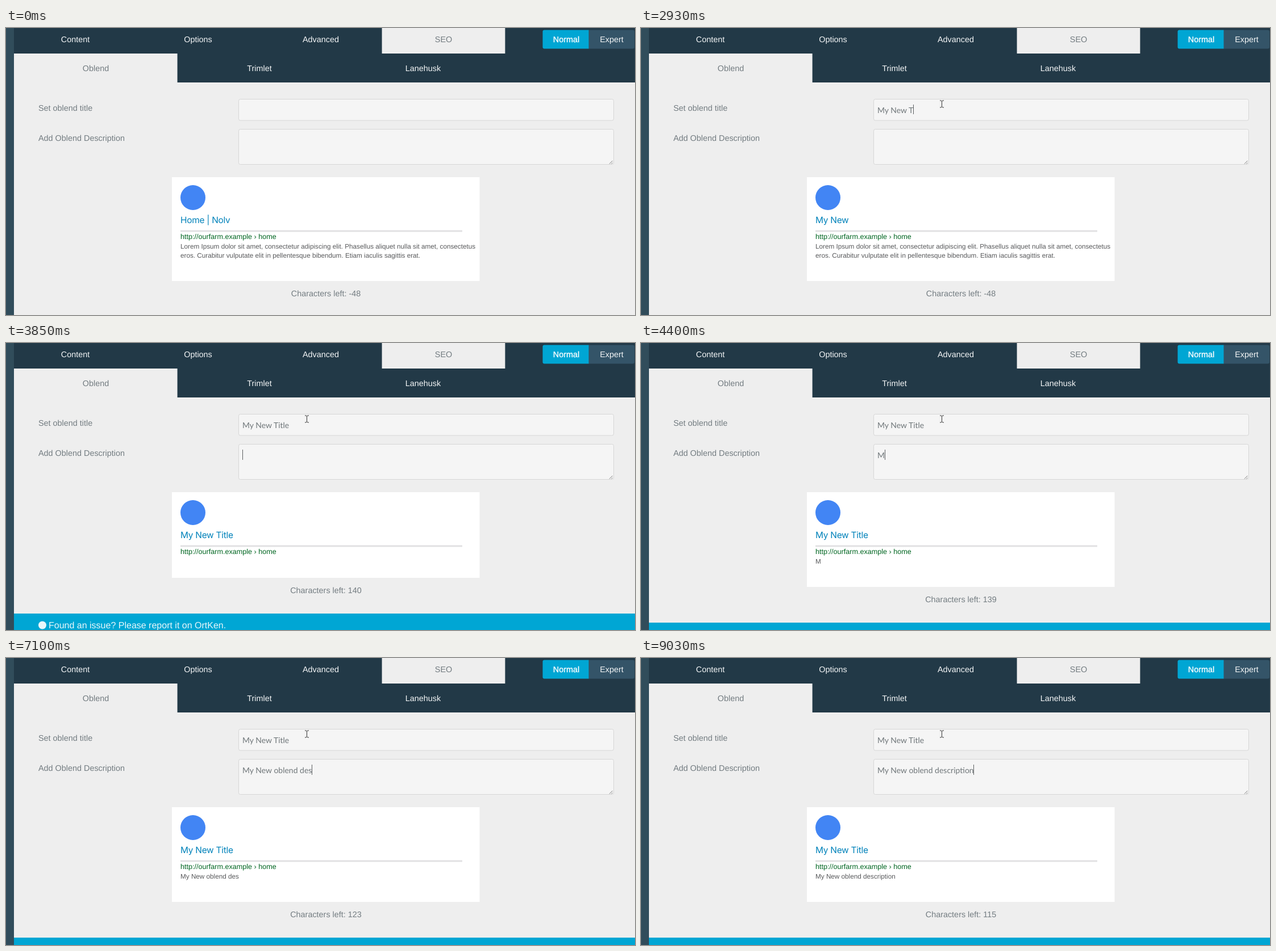
Recreate the animation shown at these times as an HTML page. Size 1107 by 506 pixels, loop 9100 ms.

```html
<!DOCTYPE html>
<html lang="en">
<head>
<meta charset="utf-8">
<title>Search preview form</title>
<style>
  html, body { margin: 0; width: 100%; height: 100%; overflow: hidden; background: #eee; }
  svg { display: block; }
  text { font: 14.4px "Liberation Sans", Arial, sans-serif; fill: #737c81; white-space: pre; text-rendering: geometricPrecision; }
  .mid text, text.mid { text-anchor: middle; }
  .light text { fill: #f4f6f7; }
  .light text.active { fill: #737c81; }
  .light text.chosen { fill: #fff; stroke: #fff; stroke-width: .3px; }
  .box { fill: #f5f5f5; stroke: #d6d6d6; }
  .typed { font: 14px Lato, sans-serif; fill: #6f7679; }
  #headline { font: 15.5px Inter, sans-serif; letter-spacing: -.3px; fill: #0082ba; }
  .link { font-size: 12.6px; fill: #006621; }
  .snippet { font-size: 11.73px; fill: #58595b; }
  #footer text { font-size: 16px; fill: #e9f7fb; }
</style>
</head>
<body>
<svg width="1107" height="506" viewBox="0 0 1107 506">
  <rect width="1107" height="506" fill="#eee"/>
  <rect width="14" height="506" fill="#314d5b"/>
  <path d="M14 0H1107V96H14z" fill="#223947"/>
  <path d="M661.600 0H878.400V45H661.600zM14 45H301.600V96H14z" fill="#eee"/>
  <path d="M1025 3.500h78a3 3 0 0 1 3 3v27a3 3 0 0 1-3 3h-78z" fill="#345468"/>
  <path d="M1025.500 3.500h-78a3 3 0 0 0-3 3v27a3 3 0 0 0 3 3h78z" fill="#00a6d4"/>
  <g class="mid light">
    <text x="122" y="25">Content</text>
    <text x="338" y="25">Options</text>
    <text x="554" y="25">Advanced</text>
    <text x="770" y="25" class="active">SEO</text>
    <text x="986" y="25" class="chosen">Normal</text>
    <text x="1066" y="25">Expert</text>
    <text x="158" y="76" class="active">Oblend</text>
    <text x="446" y="76">Trimlet</text>
    <text x="734" y="76">Lanehusk</text>
  </g>

  <text x="57" y="146">Set oblend title</text>
  <text x="57" y="199">Add Oblend Description</text>
  <rect class="box" x="409.500" y="125.500" width="660" height="37.500" rx="3"/>
  <rect class="box" x="409.500" y="178.500" width="660" height="62" rx="3"/>
  <path d="M1062 239.500l5.500-5.500M1065.500 239.500l2-2" stroke="#777"/>
  <text class="typed" id="title" x="416" y="149.500"></text>
  <text class="typed" id="desc" x="416" y="202.500"></text>
  <rect id="caret" width="1" fill="#5c5f61"/>

  <rect id="card" x="292" y="263" width="541.500" fill="#fff"/>
  <circle cx="329" cy="299" r="22" fill="#4285f4"/>
  <text id="headline" x="307" y="343.500"></text>
  <rect x="307" y="356.500" width="496" height="3" fill="#e2e1e3"/>
  <text class="link" x="307" y="372">http://ourfarm.example › home</text>
  <text class="snippet" id="line1" x="307" y="389"></text>
  <text class="snippet" id="line2" x="307" y="405"></text>
  <text class="mid" id="counter" x="563"></text>

  <g id="footer">
    <rect x="14" width="1093" height="60" fill="#00a6d4"/>
    <circle cx="64" cy="20.500" r="7" fill="#e9f7fb"/>
    <text x="75" y="26">Found an issue? Please report it on OrtKen.</text>
  </g>
  <path id="pointer" d="M-3-6H-1L.5-5 2-6H4M.5-5V5M-3 6H-1L.5 5 2 6H4" fill="none" stroke="#333"/>
</svg>
<script>
const LOOP = 9100;
const $ = id => document.getElementById(id);
const TITLE = 'My New Title';
const DESC = 'My New oblend description';
const LOREM = [
  'Lorem Ipsum dolor sit amet, consectetur adipiscing elit. Phasellus aliquet nulla sit amet, consectetus',
  'eros. Curabitur vulputate elit in pellentesque bibendum. Etiam iaculis sagittis erat.'
];

// Moment of each keystroke, and of its echo in the preview, in 10 ms units.
const titleKeys = [99, 146, 163, 193, 208, 239, 255, 293, 316, 331, 339, 354];
const titleEcho = [116, 146, 163, 201, 216, 247, 255, 301, 324, 339, 346, 362];
const descKeys = [432, 463, 493, 533, 548, 571, 586, 602, 609, 617, 624, 632, 640,
  648, 663, 695, 703, 718, 741, 756, 764, 794, 802, 817, 825];
const descEcho = [440, 470, 501, 533, 556, 579, 594, 609, 617, 624, 632, 640, 648,
  655, 670, 703, 710, 726, 749, 764, 779, 802, 809, 825, 833];
const CLEARED = 3850, FOCUS_DESC = 3770;
const caretShown = [[910, 1380], [1460, 4170], [4320, 8630], [9030, LOOP]];

const typed = (text, times, t) => text.slice(0, times.filter(k => k * 10 <= t).length);
const set = (id, attrs) => {
  for (const name in attrs) $(id).setAttribute(name, attrs[name]);
};
const write = (id, text) => {
  if ($(id).textContent !== text) $(id).textContent = text;
};

function drawPointer(t) {
  const p = Math.min(5, Math.max(0, Math.floor((t - 210) / 76))) / 5;
  const left = (1 - p) ** 2;
  const x = Math.round(529 + 294 * left), y = Math.round(134 + 247 * left);
  set('pointer', { transform: `translate(${x} ${y})`, visibility: t < 210 ? 'hidden' : 'visible' });
}

function drawCaret(t) {
  const inDesc = t >= FOCUS_DESC;
  const x = 416 + Math.floor($(inDesc ? 'desc' : 'title').getComputedTextLength());
  const on = caretShown.some(([from, to]) => t >= from && t < to);
  set('caret', {
    x, y: inDesc ? 188 : 135, height: inDesc ? 18 : 17,
    visibility: on ? 'visible' : 'hidden'
  });
}

function draw(t) {
  write('title', typed(TITLE, titleKeys, t));
  write('desc', typed(DESC, descKeys, t));
  write('headline', typed(TITLE, titleEcho, t) || 'Home | Nolv');

  const echo = typed(DESC, descEcho, t);
  const lines = t < CLEARED ? LOREM : [echo];
  const lineCount = lines.filter(Boolean).length;
  const bottom = 414 + 16 * lineCount;
  write('line1', lines[0]);
  write('line2', lines[1] || '');
  write('counter', 'Characters left: ' + (t < CLEARED ? -48 : 140 - echo.length));
  set('card', { height: bottom - 263 });
  set('counter', { y: bottom + 27 });
  set('footer', { transform: `translate(0 ${bottom + 63})` });

  drawCaret(t);
  drawPointer(t);
}

const start = performance.now();
function tick() {
  draw((performance.now() - start) % LOOP);
  requestAnimationFrame(tick);
}
tick();
</script>
</body>
</html>
```
